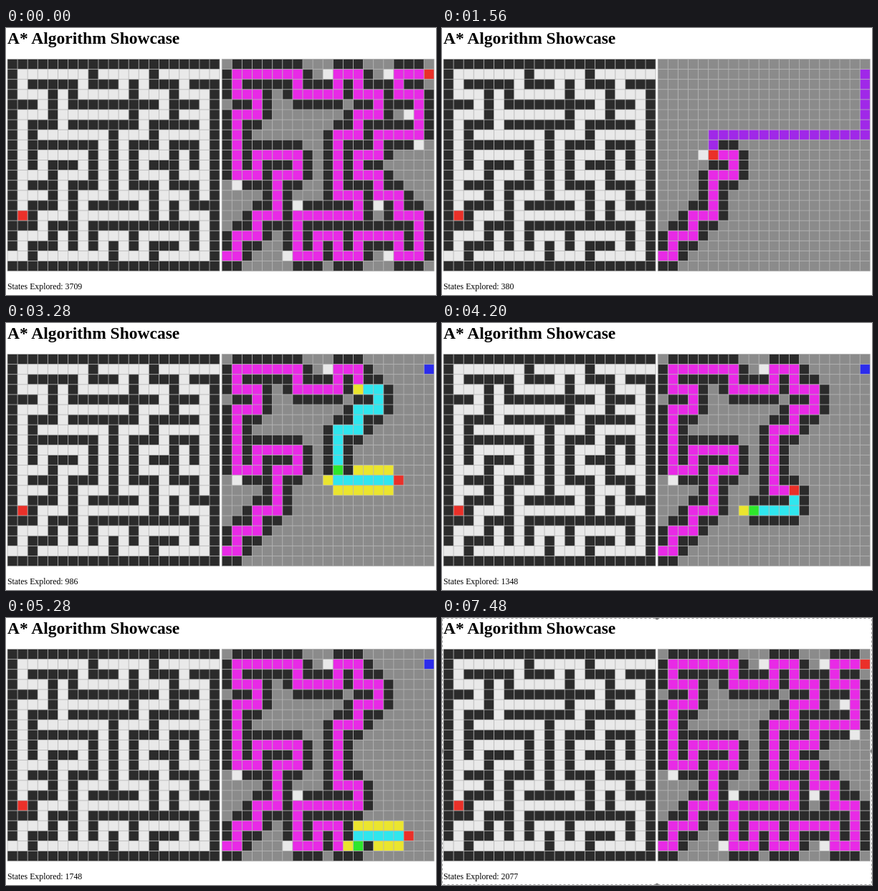
Recreate the animation shown at these times as an HTML page with a canvas. Size 600 px wide and 373 px high, loop 7.52 s.

```html
<!DOCTYPE html>
<html lang="en">
<head>
<meta charset="utf-8">
<title>A* Algorithm Showcase</title>
<style>
  html, body { margin: 0; width: 100%; height: 100%; overflow: hidden; background: #fff; }
  #stage { position: relative; width: 600px; height: 373px; overflow: hidden; }
  canvas { position: absolute; left: 0; top: 0; }
  h1, p {
    position: absolute; left: 2px; margin: 0; color: #000; white-space: nowrap;
    font-family: "Times New Roman", "Liberation Serif", serif;
  }
  h1 { top: 1px; font-size: 23.5px; line-height: 27px; font-weight: bold; }
  p { top: 354px; font-size: 11.8px; line-height: 14px; }
</style>
</head>
<body>
<div id="stage">
  <canvas id="view" width="600" height="373"></canvas>
  <h1>A* Algorithm Showcase</h1>
  <p>States Explored: <span id="count"></span></p>
</div>
<script>
const MAZE = [
  "#####################",
  "#.......#.....#......",
  "#.#####.###.#.###.###",
  "#...#.#.....#...#...#",
  "###.#.#########.###.#",
  "#...#.......#...#...#",
  "#.###.#######.#####.#",
  "#.#.......#...#.....#",
  "#.#######.#.###.###.#",
  "#.#.....#.#.#...#.#.#",
  "#.#.###.#.#.#.###.#.#",
  "#...#...#.#.#...#...#",
  "#.###.###.#.###.###.#",
  "#...#.#...#...#...#.#",
  "#.###.#.#####.#.#.###",
  "#.#...#.......#.#...#",
  "###.###.###########.#",
  "#...#.#.#...#.....#.#",
  "#.###.#.#.#.#.###.#.#",
  "..#.......#...#.....#",
  "#####################"
].join("");

const N = 21, PITCH = 14.1, TOP = 43.5;
const LOOP = 7520, STEP = 40, FRAME_ON = 5320, LAST_RUN = 3709;
const at = (row, col) => row * N + col;
const START = at(19, 0), GOAL = at(1, 20);

const COLORS = {
  unknown: "#8b8b8b", wall: "#2b2b2b", free: "#e9e9e9", trail: "#e82ae6",
  plan: "#a028e8", closed: "#30e6ee", open: "#ebe52e", start: "#2ee62c",
  goal: "#2c2cec", head: "#ea3029"
};

// Up, down, left, right; later neighbours win ties.
function neighbours(i) {
  const row = Math.floor(i / N), col = i % N, list = [];
  if (row > 0) list.push(i - N);
  if (row < N - 1) list.push(i + N);
  if (col > 0) list.push(i - 1);
  if (col < N - 1) list.push(i + 1);
  return list;
}

function distance(a, b) {
  return Math.abs(Math.floor(a / N) - Math.floor(b / N)) + Math.abs(a % N - b % N);
}

// Repeated forward A*: plan through unknown cells, walk until blocked, plan again.
function simulate() {
  const known = Array(N * N).fill("unknown");
  const events = [];
  let clock = 0, count = 0;

  function emit(weight, head, overlay) {
    const cells = known.slice();
    overlay(cells);
    cells[head] = "head";
    events.push({ clock, count, head, cells });
    clock += weight;
  }

  function observe(i) {
    for (const n of neighbours(i)) {
      if (known[n] === "unknown") known[n] = MAZE[n] === "#" ? "wall" : "free";
    }
  }

  function search(from) {
    const cost = new Map([[from, 0]]), parent = new Map(), closed = new Set();
    const open = [{ i: from, g: 0, f: distance(from, GOAL) }];
    while (open.length) {
      let best = 0;
      open.forEach((node, k) => {
        const top = open[best];
        if (node.f < top.f || (node.f === top.f && node.g >= top.g)) best = k;
      });
      const { i, g } = open.splice(best, 1)[0];
      if (closed.has(i)) continue;
      if (i === GOAL) break;
      closed.add(i);
      count++;
      emit(1, i, cells => {
        open.forEach(node => { cells[node.i] = "open"; });
        closed.forEach(k => { cells[k] = "closed"; });
        cells[from] = "start";
        cells[GOAL] = "goal";
      });
      for (const n of neighbours(i)) {
        if (known[n] === "wall" || closed.has(n)) continue;
        if (cost.has(n) && cost.get(n) <= g + 1) continue;
        cost.set(n, g + 1);
        parent.set(n, i);
        open.push({ i: n, g: g + 1, f: g + 1 + distance(n, GOAL) });
      }
    }
    const path = [];
    for (let i = GOAL; i !== undefined && i !== from; i = parent.get(i)) path.unshift(i);
    return path;
  }

  let agent = START;
  known[agent] = "trail";
  observe(agent);
  for (let round = 0; agent !== GOAL && round < 300; round++) {
    const path = search(agent);
    const showPlan = cells => path.forEach(i => { cells[i] = "plan"; });
    emit(8, agent, showPlan);
    while (path.length && known[path[0]] !== "wall") {
      agent = path.shift();
      known[agent] = "trail";
      if (agent !== GOAL) observe(agent);
      emit(2, agent, showPlan);
    }
  }
  return events;
}

const events = simulate();
const finish = events[events.length - 1];

// Time, states explored, row and column of the red cell.
const anchors = [
  [120, 1, 19, 0],
  [1560, 380, 9, 5],
  [3280, 986, 12, 15],
  [4200, 1348, 2, 20],
  [5280, 1748, 18, 11],
  [6200, 1967, 2, 20],
  [6840, 2086, 1, 20]
].map(([ms, count, row, col]) => {
  const score = e => Math.abs(e.count - count) * 10 + distance(e.head, at(row, col));
  const match = events.reduce((a, b) => (score(b) < score(a) ? b : a));
  return { ms, clock: match.clock };
});

function eventAt(ms) {
  const k = anchors.findIndex(a => a.ms > ms);
  if (k <= 0) return finish;
  const a = anchors[k - 1], b = anchors[k];
  const clock = a.clock + (b.clock - a.clock) * (ms - a.ms) / (b.ms - a.ms) + 1e-6;
  let lo = 0, hi = events.length - 1;
  while (lo < hi) {
    const mid = Math.ceil((lo + hi) / 2);
    if (events[mid].clock <= clock) lo = mid; else hi = mid - 1;
  }
  return events[lo];
}

const ctx = document.getElementById("view").getContext("2d");
const counter = document.getElementById("count");
const fullMap = Array.from(MAZE, ch => (ch === "#" ? "wall" : "free"));
fullMap[at(15, 1)] = "head";

function drawGrid(cells, left) {
  cells.forEach((kind, i) => {
    ctx.fillStyle = COLORS[kind];
    ctx.fillRect(left + (i % N) * PITCH, TOP + Math.floor(i / N) * PITCH, PITCH, PITCH);
  });
  ctx.strokeStyle = "#b2b2b2";
  ctx.lineWidth = 0.8;
  ctx.beginPath();
  for (let k = 0; k <= N; k++) {
    const d = k * PITCH;
    ctx.moveTo(left + d, TOP);
    ctx.lineTo(left + d, TOP + N * PITCH);
    ctx.moveTo(left, TOP + d);
    ctx.lineTo(left + N * PITCH, TOP + d);
  }
  ctx.stroke();
}

function drawSelection() {
  ctx.strokeStyle = "#a0a0a0";
  ctx.lineWidth = 1;
  ctx.setLineDash([3, 3]);
  ctx.strokeRect(0.5, 0.5, 599, 372);
  ctx.setLineDash([]);
  ctx.fillStyle = "#888";
  for (const [x, y] of [[300, 0], [300, 373], [0, 186], [600, 186]]) {
    ctx.beginPath();
    ctx.arc(x, y, 2.5, 0, Math.PI * 2);
    ctx.fill();
  }
}

function draw(ms) {
  const state = eventAt(ms);
  ctx.fillStyle = "#fff";
  ctx.fillRect(0, 0, 600, 373);
  drawGrid(fullMap, 2);
  drawGrid(state.cells, 301.2);
  if (ms >= FRAME_ON) drawSelection();
  counter.textContent = ms < anchors[0].ms ? LAST_RUN : state.count;
}

const origin = performance.now();
let shown = -1;
function tick() {
  const ms = Math.floor(((performance.now() - origin) % LOOP) / STEP) * STEP;
  if (ms !== shown) draw(shown = ms);
  requestAnimationFrame(tick);
}
tick();
</script>
</body>
</html>
```
